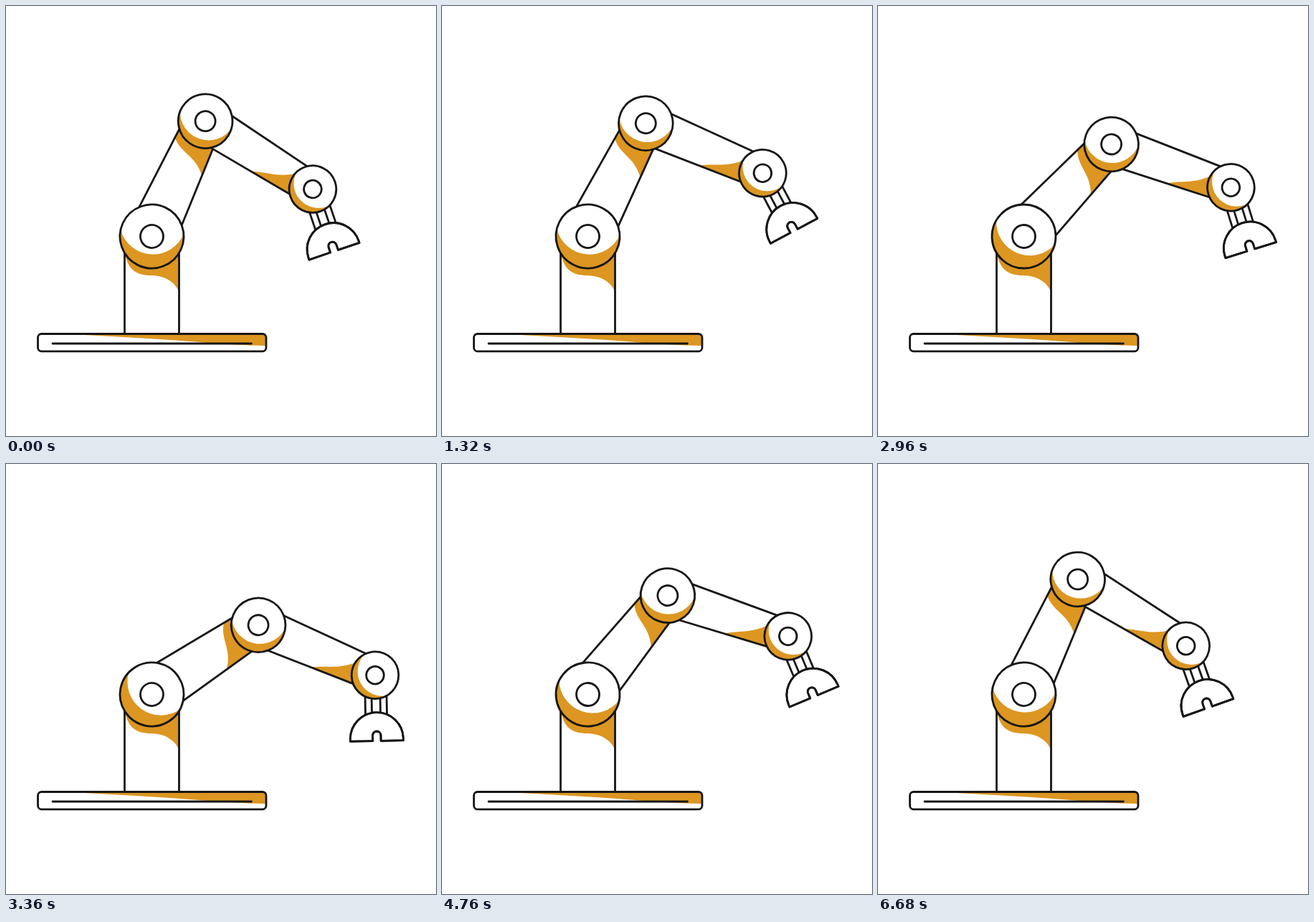
Recreate the animation shown at these times as an HTML page. Size 600 by 600 pixels, loop 6720 ms.

```html
<!DOCTYPE html>
<html lang="en">
<head>
<meta charset="utf-8">
<title>Robot arm</title>
<style>
  html, body { margin: 0; height: 100%; overflow: hidden; background: #fff; }
  svg { display: block; width: 100vw; height: 100vh; }
  .line { fill: none; stroke: #161616; stroke-width: 2.8; stroke-linejoin: round; stroke-linecap: round; }
  .body { fill: #fff; }
  .shade { fill: #dc9621; }
</style>
</head>
<body>
<svg viewBox="0 0 600 600">
  <!-- base and column -->
  <path class="shade" d="M85 458Q200 463 280 470Q320 473 363 474V458Z"/>
  <rect class="line" x="44.5" y="457.5" width="318.5" height="24.3" rx="5"/>
  <path class="line" d="M65 471H342.5"/>
  <path class="shade" d="M166 345C170 368 182 376 203 376C222 376 236 386 241 398V330H166Z"/>
  <path class="line" d="M165.5 330V457.5M241.5 330V457.5"/>

  <g id="upper">
    <path class="body" d="M20 -33.6L160 -28L160 25.2L20 31.8Z"/>
    <path class="shade" d="M138 -28C122 -12 128 8 107 27L160 25.2V-28Z"/>
    <path class="line" d="M20 -33.6L160 -28M20 31.8L160 25.2"/>
    <g class="joint" data-shape="44.5 16 69 8 25"></g>

    <g id="fore">
      <path class="body" d="M20 -26.2L160 -22.6L160 22.8L20 27.5Z"/>
      <path class="shade" d="M91 25C112 13 128 13 150 -10L160 22.8Z"/>
      <path class="line" d="M20 -26.2L160 -22.6M20 27.5L160 22.8"/>
      <g class="joint" data-shape="37.8 14 -14 3 26"></g>

      <g id="grip">
        <path class="line" d="M-14.5 20V60M-5.5 20V60M6.5 20V60M15.5 20V60"/>
        <g transform="translate(.7 0)">
          <path id="dome" class="body" d="M-37 91.7V89A37 37 0 0 1 37 89V91.7H5.7V84A5.7 5.7 0 0 0 -5.7 84V91.7Z"/>
          <path class="shade" d="M-32.3 71Q0 54 32.3 71A37 37 0 0 0 -32.3 71Z"/>
          <use href="#dome" class="line" style="fill:none"/>
          <path class="line" d="M-37 91.7V89A37 37 0 0 1 37 89V91.7H5.7V84A5.7 5.7 0 0 0 -5.7 84V91.7Z"/>
        </g>
        <g class="joint" data-shape="32.8 12.3 63 2 23"></g>
      </g>
    </g>
  </g>
</svg>
<script>
const LOOP = 6720, STEP = 40, ARM = 177.3;

// Disc with a crescent shadow whose tips rise by `lift` degrees above the diameter
for (const joint of document.querySelectorAll('.joint')) {
  const [r, hub, tilt, lift, depth] = joint.dataset.shape.split(' ').map(Number);
  const x = r * Math.cos(lift * Math.PI / 180), y = r * Math.sin(lift * Math.PI / 180);
  const sag = depth + y, inner = (x * x + sag * sag) / (2 * sag);
  joint.innerHTML = `
    <circle class="body" r="${r}"/>
    <path class="shade" transform="rotate(${tilt})"
      d="M${-x} ${-y}A${inner} ${inner} 0 0 0 ${x} ${-y}A${r} ${r} 0 1 1 ${-x} ${-y}Z"/>
    <circle class="line" r="${r}"/><circle class="line" r="${hub}"/>`;
}

// Absolute angles of upper arm, forearm and gripper
const rest = [-65.1, 32.35, -18.7], raised = [-61.2, 16.15, -35], reach = [-33.06, 23.24, -1.1];
const moves = [
  [840, 1680, rest, raised],
  [2520, 3360, raised, reach],
  [4222, 5062, reach, raised],
  [5880, 6720, raised, rest]
];

function poseAt(t) {
  let pose = rest;
  for (const [start, end, from, to] of moves) {
    if (t < start) break;
    const p = Math.min(1, (t - start) / (end - start));
    pose = from.map((angle, i) => angle + (to[i] - angle) * p);
  }
  return pose;
}

const place = (id, x, y, angle) =>
  document.getElementById(id).setAttribute('transform', `translate(${x} ${y}) rotate(${angle})`);

function draw() {
  const t = Math.floor(performance.now() % LOOP / STEP) * STEP;
  const [upper, fore, grip] = poseAt(t);
  place('upper', 203.5, 321.5, upper);
  place('fore', ARM, 0, fore - upper);
  place('grip', ARM, 0, grip - fore);
  requestAnimationFrame(draw);
}
draw();
</script>
</body>
</html>
```
